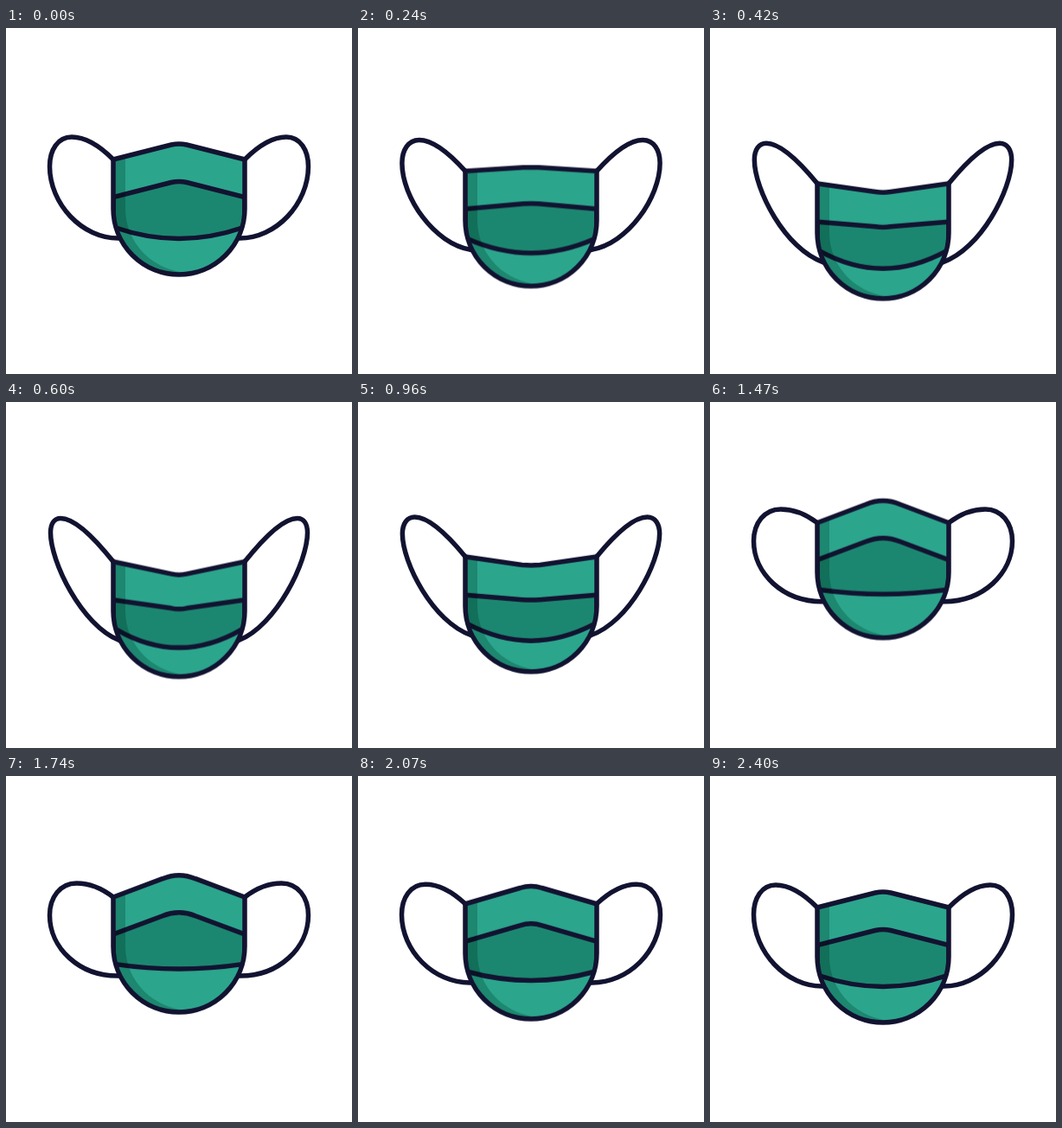
These frames come from a looping animation (400x400 px, 4.43 s). An HTML page without scripts:

```html
<!DOCTYPE html>
<html lang="en">
<head>
<meta charset="utf-8">
<title>Face mask</title>
<style>
  html, body { margin: 0; width: 100%; height: 100%; overflow: hidden; background: #fff; }
  svg { display: block; width: 100%; height: 100%; }

  .mask { animation: bob 4430ms infinite; }
  .body, .fold, .hem, .loop { animation: morph 4430ms infinite; }
  .line, .fold, .hem { stroke: #121331; stroke-width: 5.5; stroke-linecap: round; stroke-linejoin: round; }
  .line { fill: none; }
  .light { fill: #2ca58d; }
  .dark { fill: #1c8770; }
  .shade { fill: #a3d1ca; mix-blend-mode: multiply; }

  /* Sink, lift, settle, then rest */
  @keyframes bob {
    0% { transform: translateY(0); animation-timing-function: cubic-bezier(.39, 0, .32, 1); }
    15.58% { transform: translateY(33px); animation-timing-function: cubic-bezier(.6, 0, .4, 1); }
    35.44% { transform: translateY(-13px); animation-timing-function: cubic-bezier(.45, 0, .55, 1); }
    54.18%, 100% { transform: translateY(0); }
  }
  @keyframes morph {
    0% { d: var(--rest); animation-timing-function: cubic-bezier(.39, 0, .32, 1); }
    15.58% { d: var(--down); animation-timing-function: cubic-bezier(.6, 0, .4, 1); }
    35.44% { d: var(--up); animation-timing-function: cubic-bezier(.45, 0, .55, 1); }
    54.18%, 100% { d: var(--rest); }
  }

  .body {
    --rest: path("M124 152 L191 135 Q200 133 209 135 L276 152 V209 A76 76 0 0 1 124 209 Z");
    --down: path("M124 152 L191 166.5 Q200 168.7 209 166.5 L276 152 V209 A76 76 0 0 1 124 209 Z");
    --up: path("M124 152 L180 130.3 Q200 121.7 220 130.3 L276 152 V209 A76 76 0 0 1 124 209 Z");
  }
  .fold {
    --rest: path("M124 195.5 L191 178.5 Q200 176.3 209 178.5 L276 195.5 V300 H124 Z");
    --down: path("M124 196.3 L191 206.2 Q200 208.3 209 206.2 L276 196.3 V300 H124 Z");
    --up: path("M124 195 L180 173.3 Q200 165 220 173.3 L276 195 V300 H124 Z");
  }
  .hem {
    --rest: path("M127 231 Q200 256 273 231 V300 H127 Z");
    --down: path("M127 230 Q200 273 273 230 V300 H127 Z");
    --up: path("M127 229.5 Q200 239 273 229.5 V300 H127 Z");
  }
  .loop {
    --rest: path("M124 152 C108 136 91 126 76 126 C60 126 50.5 141 50.5 160 C50.5 203 88 244 131 243");
    --down: path("M124 185 C105 161 80 134.5 63 134.5 C55.5 134.5 51.5 141 51.5 151 C51.5 184 87 258 131 276");
    --up: path("M124 139 C112 130 98 123.8 82 123.8 C63 123.8 50.5 140 50.5 161 C50.5 198 84 231 131 230");
  }
</style>
</head>
<body>
<svg viewBox="0 0 400 400">
  <clipPath id="inside"><path class="body"/></clipPath>
  <g class="line">
    <path class="loop"/>
    <g transform="translate(400) scale(-1 1)"><path class="loop"/></g>
  </g>
  <g class="mask">
    <g clip-path="url(#inside)">
      <path class="body light"/>
      <path class="fold dark"/>
      <path class="hem light"/>
      <path class="shade" d="M110 110 H138 V209 A76 74 0 0 0 212 283 V300 H110 Z"/>
    </g>
    <path class="body line"/>
  </g>
</svg>
</body>
</html>
```
